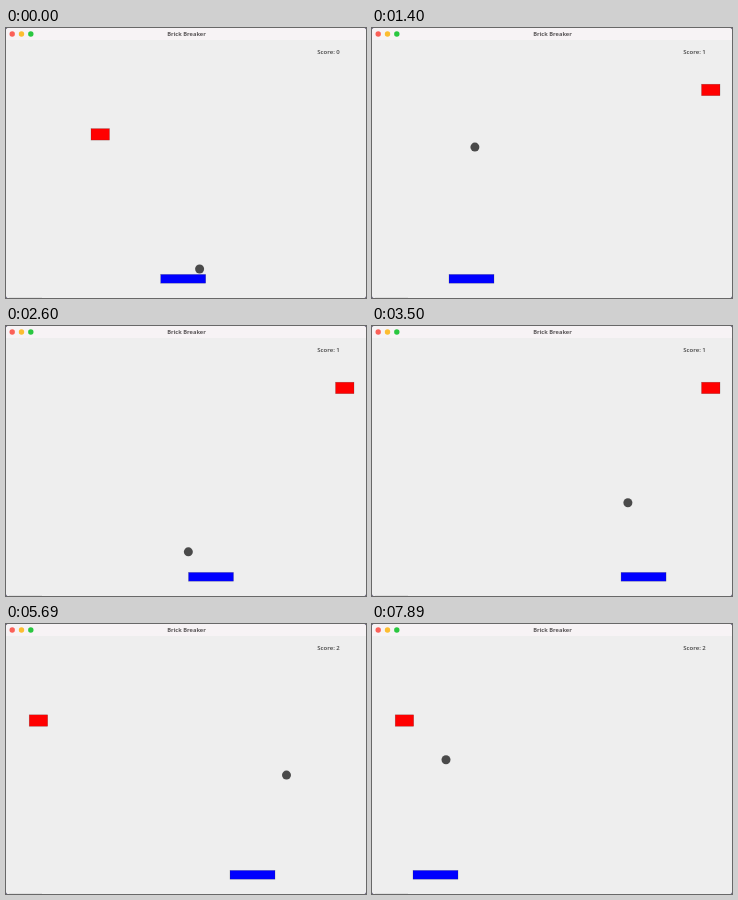
Animation of 360 by 270 pixels, one loop 7990 ms. Source, as an HTML page:

```html
<!DOCTYPE html>
<html lang="en">
<head>
<meta charset="utf-8">
<title>Brick Breaker</title>
<style>
  html, body { margin: 0; width: 100%; height: 100%; overflow: hidden; background: #eee; }
  svg { display: block; width: 100vw; height: 100vh; }
  text { font-family: "Open Sans", "Noto Sans", sans-serif; }
  .title { font-size: 5.7px; font-weight: 700; fill: #5a5658; text-anchor: middle; }
  .score { font-size: 6px; font-weight: 600; fill: #444; }
  .edge { stroke: #333; stroke-width: .5; stroke-opacity: .4; }
</style>
</head>
<body>
<svg viewBox="0 0 360 270">
  <rect width="360" height="270" fill="#5a5078"/>
  <rect width="360" height="270" rx="2.6" fill="#eee"/>
  <path d="M0 12V2.6Q0 0 2.6 0H357.4Q360 0 360 2.6V12Z" fill="#f7f3f5"/>
  <path d="M3 269.7H36" stroke="#ccc" stroke-width=".6"/>
  <circle cx="6.2" cy="6" r="2.7" fill="#fb6058"/>
  <circle cx="15.5" cy="6" r="2.7" fill="#fcbd30"/>
  <circle cx="24.8" cy="6" r="2.7" fill="#2ac740"/>
  <text class="title" x="180.5" y="8">Brick Breaker</text>
  <text class="score" id="score" x="311.3" y="26"></text>
  <rect class="edge" id="brick" width="18.5" height="11.5" fill="#f00"/>
  <rect class="edge" id="paddle" y="246.4" width="45" height="8.8" fill="#00f"/>
  <circle id="ball" r="4.5" fill="#4a4a4a"/>
</svg>
<script>
  const LOOP = 7990, FRAME = 100;
  const BRICK = { w: 18.5, h: 11.5 };
  const HIT = 5.7, NEAR = 21;            // ball reach for a hit and for scoring
  const WALL = 357.85, FLOOR = 241.3;    // limits of the ball's centre
  const KICK = 54;                       // sideways speed gained at the paddle
  const brickSpots = [[85, 100.6], [329.5, 56.2], [23.2, 90.8]];

  // Paddle turns and changes of pace: seconds, left edge.
  const paddleKeys = [[0, 154.7], [1.4, 77], [2.6, 182.5], [4.5, 323], [5.7, 224], [6.9, 131], [7.9, 41]];

  const within = (v, low, size, reach) => v > low - reach && v < low + size + reach;

  function touches({ x, y }, [left, top], reach) {
    return within(x, left, BRICK.w, reach) && within(y, top, BRICK.h, reach);
  }

  // Plays the game from its start up to the given time, one millisecond per step.
  function play(ms) {
    const ball = { x: 193.6, y: 241, vx: -66.2, vy: -89 };
    let hits = 0;
    for (let i = 0; i < ms; i++) {
      ball.x += ball.vx / 1000;
      ball.y += ball.vy / 1000;
      if (ball.x > WALL) ball.vx = -Math.abs(ball.vx);
      if (ball.y > FLOOR && ball.vy > 0) {
        ball.vy *= -1;
        ball.vx = Math.sign(ball.vx) * Math.hypot(ball.vx, KICK);
      }
      if (touches(ball, brickSpots[hits], HIT)) {
        ball.vx *= -1;
        ball.vy *= -1;
        hits = Math.min(hits + 1, brickSpots.length - 1);
      }
    }
    const spot = brickSpots[hits];
    return { ball, spot, score: hits + touches(ball, spot, NEAR) };
  }

  function paddleAt(s) {
    const i = paddleKeys.findLastIndex(([at], n) => at <= s && n < paddleKeys.length - 1);
    const [[t0, x0], [t1, x1]] = paddleKeys.slice(i, i + 2);
    return x0 + (x1 - x0) * Math.min(1, (s - t0) / (t1 - t0));
  }

  const [ball, paddle, brick, score] =
    ["ball", "paddle", "brick", "score"].map(id => document.getElementById(id));
  const move = (el, x, y) => el.setAttribute("transform", `translate(${x} ${y})`);

  function draw(now) {
    const t = Math.floor((now % LOOP + 10) / FRAME) * FRAME;
    const game = play(t);
    move(ball, game.ball.x, game.ball.y);
    move(brick, ...game.spot);
    move(paddle, paddleAt(t / 1000), 0);
    score.textContent = `Score: ${game.score}`;
  }

  let start;
  function tick(now) {
    start ??= now;
    draw(now - start);
    requestAnimationFrame(tick);
  }
  draw(0);
  requestAnimationFrame(tick);
</script>
</body>
</html>
```
